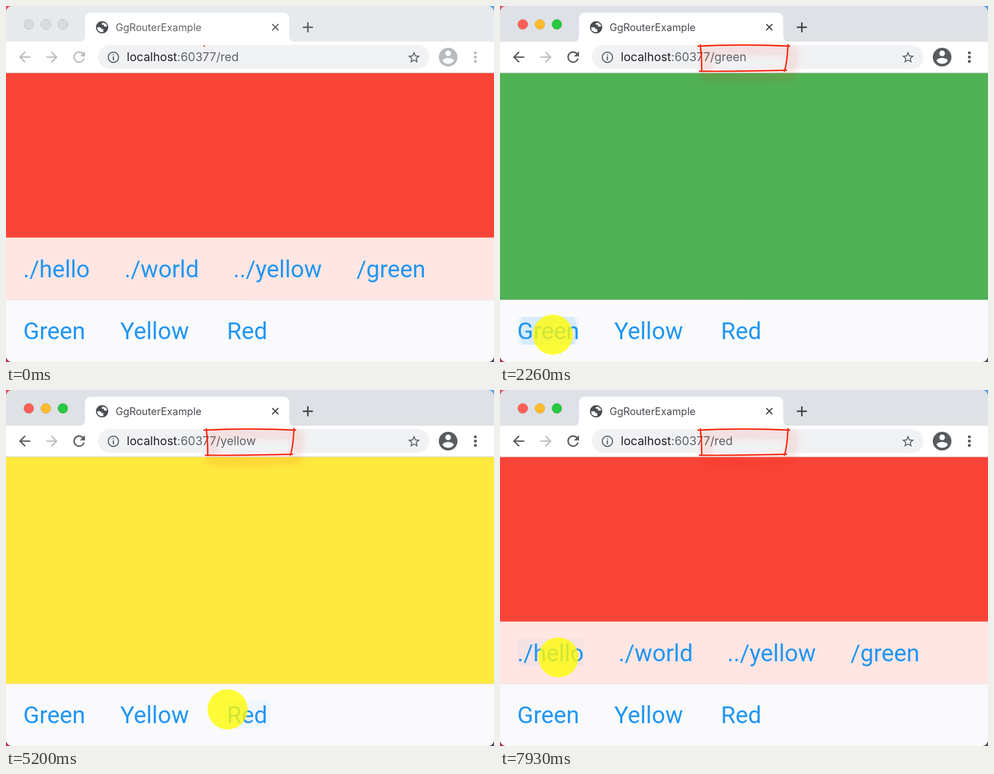
Animation, 877 px wide and 639 px high, one loop 8000 ms. Source, as an HTML page:

```html
<!DOCTYPE html>
<html lang="en">
<head>
<meta charset="utf-8">
<title>Router example</title>
<style>
  html, body { margin: 0; width: 100%; height: 100%; overflow: hidden; }
  svg { display: block; width: 100%; height: 100%; }
  .ui { font-family: Inter, sans-serif; }
  .link { font: 42.5px Roboto, sans-serif; fill: #2196f3; }
  .line { fill: none; stroke-linecap: round; stroke-linejoin: round; }
</style>
</head>
<body>
<svg viewBox="0 0 877 639" xmlns="http://www.w3.org/2000/svg">
  <defs>
    <clipPath id="window"><rect width="877" height="639" rx="11"/></clipPath>
    <clipPath id="button"><rect id="buttonBox" rx="4"/></clipPath>
    <filter id="glow" filterUnits="userSpaceOnUse" x="320" y="40" width="260" height="130">
      <feDropShadow dx="9" dy="9" stdDeviation="8" flood-color="#ff2a10" flood-opacity=".65"/>
    </filter>
  </defs>

  <!-- desktop seen behind the rounded corners -->
  <rect width="440" height="320" fill="#e2455a"/>
  <rect x="438" width="439" height="320" fill="#4b9be0"/>
  <rect y="319" width="440" height="320" fill="#b62a52"/>
  <rect x="438" y="319" width="439" height="320" fill="#4a4f5c"/>

  <g clip-path="url(#window)">
    <rect id="strip" width="877" height="65"/>
    <g id="lights"></g>
    <path d="M132 64q10 0 10-10V24q0-12 12-12H497q12 0 12 12V54q0 10 10 10Z" fill="#fff"/>
    <rect y="64" width="877" height="57" fill="#fff"/>
    <rect x="165" y="70" width="596" height="43" rx="21.5" fill="#f1f2f4"/>

    <g id="icons"></g>
    <g transform="translate(172.7 38.2) scale(1.1) translate(-12 -12)">
      <circle cx="12" cy="12" r="10" fill="#4a4e53"/>
      <path d="M13.500 4.300q-3.200 1-1.500 3.700h3v3h4.800q.7-5-6.300-6.700zM4 12h4q3 0 3 3h3v4.500q-5.500 1.200-8.800-2.500Q3.800 14.500 4 12z" fill="#fff"/>
    </g>
    <text id="title" class="ui" x="197" y="44.5" font-size="18.2">GgRouterExample</text>
    <g class="line" stroke="#5f6368" stroke-width="2">
      <circle cx="193" cy="92" r="9.3"/>
      <path d="M193 91.5V96.5M193 87.4V87.5" stroke-width="2.3"/>
    </g>
    <text class="ui" x="217" y="99.3" font-size="21.2" fill="#5f6368"><tspan fill="#202124">localhost</tspan>:60377<tspan id="route"></tspan></text>
    <g id="tabMarks" fill="none">
      <path d="M478.5 32.5l11 11M489.5 32.5l-11 11" stroke-width="2.1"/>
      <path d="M533.5 38.2h18M542.5 29.2v18" stroke-width="2.7"/>
    </g>
    <g id="dots"><circle cx="843.5" cy="84" r="2.6"/><circle cx="843.5" cy="91.7" r="2.6"/><circle cx="843.5" cy="99.4" r="2.6"/></g>

    <rect y="119.4" width="877" height="1.6" fill="#d0d1d5"/>
    <rect id="page" y="120.5" width="877" height="407"/>
    <rect id="subBar" y="415.6" width="877" height="112" fill="#ffe6e3"/>
    <rect y="527.3" width="877" height="112" fill="#fafafd"/>
    <g id="hover" clip-path="url(#button)" fill="#2196f3">
      <rect width="877" height="639" opacity=".045"/>
      <circle id="ripple"/>
    </g>
    <g id="subLinks" class="link"></g>
    <g id="mainLinks" class="link"></g>
  </g>

  <g id="mark" class="line" stroke="#f92208" stroke-width="2.4" filter="url(#glow)">
    <path d="M356 72Q436 68 520.5 72"/>
    <path d="M517.5 69.5Q516 104 510.8 117"/>
    <path d="M358.5 117Q440 117.5 515 115.3"/>
    <path d="M360 70Q363 94 362.5 117.5"/>
  </g>
  <circle id="pointer" r="36" fill="#fffb04" opacity=".79"/>
</svg>

<script>
const NS = 'http://www.w3.org/2000/svg';
const $ = id => document.getElementById(id);
const LOOP = 8000, TICK = 1000 / 15;

function add(parent, tag, attrs, text) {
  const el = document.createElementNS(NS, tag);
  set(el, attrs);
  if (text) el.textContent = text;
  parent.appendChild(el);
  return el;
}
function set(el, attrs) {
  for (const k in attrs) el.setAttribute(k, attrs[k]);
}

// Toolbar icons on a 24 unit grid, placed by their centre.
const ARROW = 'M20 11H7.83l5.59-5.59L12 4l-8 8 8 8 1.41-1.41L7.83 13H20v-2z';
const RELOAD = 'M17.65 6.35A7.96 7.96 0 0012 4c-4.42 0-7.99 3.58-7.99 8s3.57 8 7.99 8c3.73 0 6.84-2.55 7.73-6h-2.08A5.99 5.99 0 0112 18c-3.31 0-6-2.69-6-6s2.69-6 6-6c1.66 0 3.14.69 4.22 1.78L13 11h7V4l-2.35 2.35z';
const STAR = 'M22 9.24l-7.19-.62L12 2 9.19 8.63 2 9.24l5.46 4.73L5.82 21 12 17.27 18.18 21l-1.63-7.03L22 9.24zM12 15.4l-3.76 2.27 1-4.28-3.32-2.88 4.38-.38L12 6.1l1.71 4.04 4.38.38-3.32 2.88 1 4.28L12 15.4z';
const PERSON = 'M12 2C6.48 2 2 6.48 2 12s4.48 10 10 10 10-4.48 10-10S17.52 2 12 2zm0 3c1.66 0 3 1.34 3 3s-1.34 3-3 3-3-1.34-3-3 1.34-3 3-3zm0 14.2c-2.5 0-4.71-1.28-6-3.22.03-1.99 4-3.08 6-3.08 1.99 0 5.97 1.09 6 3.08-1.29 1.94-3.5 3.22-6 3.22z';

function icon(d, x, y, sx, sy, fill = 'none') {
  const transform = `translate(${x} ${y}) scale(${sx} ${sy}) translate(-12 -12)`;
  return add($('icons'), 'path', { d, transform, fill });
}
icon(ARROW, 82.5, 91.7, -1.27, 1.27, '#bbbdc0');
icon(STAR, 733.3, 92.4, 1.08, 1.08, '#5a5e63');
const fading = [
  icon(ARROW, 33.5, 91.7, 1.27, 1.27),
  icon(RELOAD, 131.5, 91.7, 1.3, 1.3),
  icon(PERSON, 794.6, 91.7, 1.68, 1.68),
  $('dots')
];

const lights = ['#ff5f57', '#febc2e', '#28c840'].map((color, i) => ({
  color, el: add($('lights'), 'circle', { cx: 41 + i * 30.6, cy: 33, r: 9, 'stroke-opacity': .13, stroke: '#000' })
}));

// Links: label, text x, button x, button width
const mainLinks = [['Green', 31, 31, 111], ['Yellow', 205.3, 205, 125], ['Red', 397, 391, 84]];
const subLinks = [['./hello', 31, 31, 120], ['./world', 213, 213, 133], ['../yellow', 408.5, 408, 158], ['/green', 630, 630, 123]];
function addLinks(group, links, baseline) {
  return links.map(([label, x, left, width]) => {
    add(group, 'text', { x, y: baseline }, label);
    return { x: left, y: baseline - 40, width, height: 50 };
  });
}
const mainBoxes = addLinks($('mainLinks'), mainLinks, 598);
const subBoxes = addLinks($('subLinks'), subLinks, 486.5);

// Pointer moves: start, end, from x, y, to x, y, bend
const moves = [
  [400, 667, 128, 678, 98, 602, 0],
  [867, 1067, 98, 602, 95, 590, 0],
  [2867, 3267, 95, 590, 231, 584, 0],
  [3333, 3467, 231, 584, 239, 582, 0],
  [4800, 5400, 239, 582, 454, 581, -11],
  [7267, 7733, 454, 581, 93, 487, 0],
  [7733, 7933, 93, 487, 105, 480, 0]
];
function pointerAt(t) {
  let m = moves[0];
  for (const next of moves) if (t >= next[0]) m = next;
  const [start, end, x0, y0, x1, y1, bend] = m;
  const p = Math.max(0, Math.min(1, (t - start) / (end - start)));
  const e = p * p * (3 - 2 * p);
  return { x: x0 + (x1 - x0) * e, y: y0 + (y1 - y0) * e + bend * Math.sin(Math.PI * e) };
}

const strokes = [...$('mark').children].map(el => ({ el, length: el.getTotalLength() }));
const markLength = strokes.reduce((sum, s) => sum + s.length, 0);
function drawMark(p) {
  let left = Math.max(.5, p * markLength);
  for (const { el, length } of strokes) {
    const shown = Math.max(0, Math.min(length, left));
    set(el, { 'stroke-dasharray': shown >= length ? 'none' : `${shown} ${length + 9}`, visibility: shown > 0 ? 'visible' : 'hidden' });
    left -= length;
  }
}

const colors = { red: '#f84436', green: '#50b155', yellow: '#ffe93d' };
const pageAt = t => t < 2260 ? 'red' : t < 4260 ? 'green' : t < 5860 ? 'yellow' : 'red';
const routeAt = t => t < 2260 ? 'red' : t < 4330 ? 'green' : t < 5860 ? 'yellow' : 'red';
const presses = [2260, 4330, 5930];

function drawChrome(active) {
  set($('strip'), { fill: active ? '#dee1e5' : '#e7eaec' });
  for (const { el, color } of lights) set(el, { fill: active ? color : '#d9dbdc' });
  for (const el of fading) set(el, { fill: active ? '#585c61' : '#b9bcbe' });
  set($('title'), { fill: active ? '#45494e' : '#606468' });
  set($('tabMarks'), { stroke: active ? '#404448' : '#5c6064' });
}

function drawHover(t, pos, page, active) {
  const boxes = page === 'red' ? mainBoxes.concat(subBoxes) : mainBoxes;
  const box = active && boxes.find(b =>
    pos.x >= b.x && pos.x <= b.x + b.width && pos.y >= b.y && pos.y <= b.y + b.height);
  set($('hover'), { visibility: box ? 'visible' : 'hidden' });
  if (!box) return;
  set($('buttonBox'), box);
  const press = presses.find(p => t >= p && t < p + 340);
  const age = press ? t - press : 340;
  set($('ripple'), {
    cx: box.x + box.width / 2, cy: box.y + 25,
    r: 52 + age * .08, opacity: .12 * (1 - age / 340)
  });
}

function draw(time) {
  const t = Math.floor((time + 8) / TICK) * TICK;
  const active = t >= 930;
  const page = pageAt(t);
  const pos = pointerAt(t);
  drawChrome(active);
  drawMark(Math.min(1, t / 1140));
  $('route').textContent = '/' + routeAt(t);
  set($('page'), { fill: colors[page] });
  for (const id of ['subBar', 'subLinks']) set($(id), { visibility: page === 'red' ? 'visible' : 'hidden' });
  drawHover(t, pos, page, active);
  set($('pointer'), { cx: pos.x, cy: pos.y, visibility: t < 400 ? 'hidden' : 'visible' });
}

const began = performance.now();
function frame() {
  draw((performance.now() - began) % LOOP);
  requestAnimationFrame(frame);
}
frame();
</script>
</body>
</html>
```
